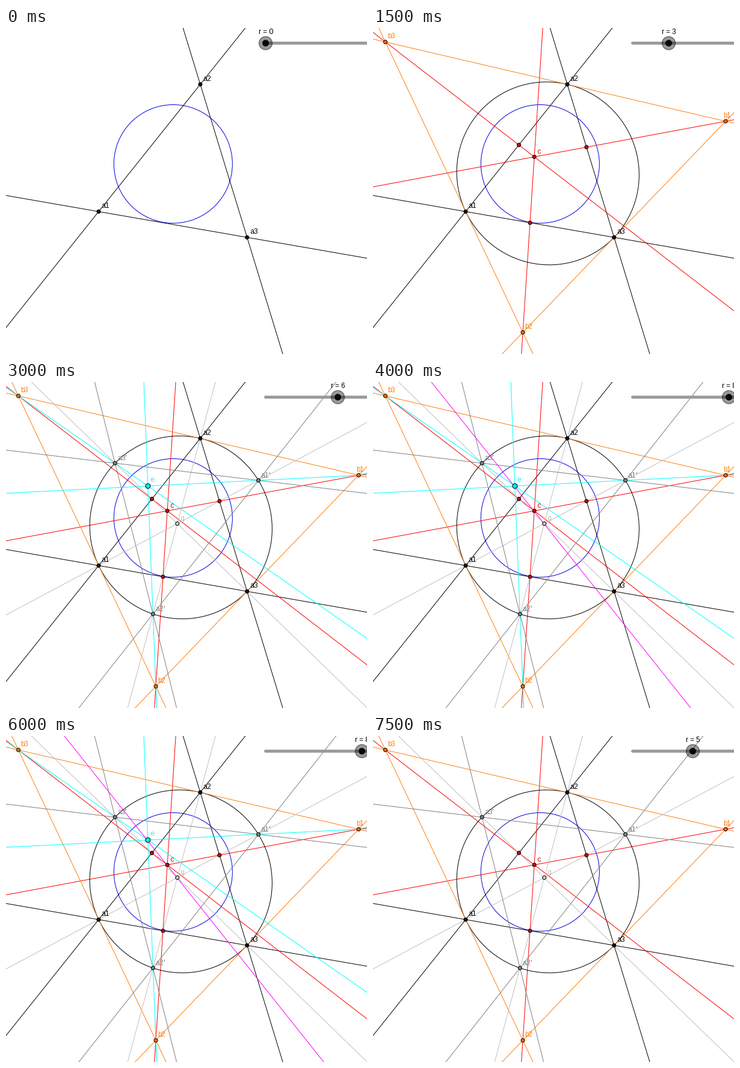
Write a matplotlib script that moves like this. It is 600 px wide and 542 px high and loops after 8000 ms.

```python
import matplotlib.pyplot as plt
import numpy as np
from matplotlib.animation import FuncAnimation
from matplotlib.patches import Circle

W, H, DPI = 600, 542, 100
PX = 72 / DPI  # one pixel in points
STEP_MS = 500
FRAMES = 16

BLACK, BLUE, RED, ORANGE = "#000000", "#0000e0", "#ff0000", "#ff7f0e"
GREY, SILVER, CYAN = "#808080", "#c0c0c0", "#00ffff"
MAGENTA, INDIGO = "#ff00ff", "#4b0082"

plt.rcParams["font.family"] = "Liberation Sans"
plt.rcParams["text.hinting_factor"] = 1  # whole-pixel letter spacing
plt.rcParams["toolbar"] = "None"

fig = plt.figure(figsize=(W / DPI, H / DPI), dpi=DPI, facecolor="white")
ax = fig.add_axes([0, 0, 1, 1])
ax.set_xlim(0, W)
ax.set_ylim(H, 0)
ax.axis("off")

# The blue circle is the absolute of a projective metric.
CENTER, RADIUS = np.array([277.8, 226.0]), 98.5
CORNERS = np.array([[154.0, 305.2], [322.9, 93.7], [400.7, 348.1]])

rel = CORNERS - CENTER
gram = rel @ rel.T - RADIUS**2
weights = 1 / np.sqrt(np.diag(gram))
gram = gram * np.outer(weights, weights)
SIDES = 1 - np.array([gram[1, 2], gram[0, 2], gram[0, 1]])


def point(coords):
    """Stage position of coordinates relative to the normalised corners."""
    mass = np.asarray(coords) * weights
    return mass @ CORNERS / mass.sum(axis=-1, keepdims=True)


P = {
    "c": point(np.linalg.solve(gram, np.ones(3))),
    "g": point([1, 1, 1]),
    "e": point(SIDES * (np.sum(SIDES**2) - 2 * SIDES**2)),
    "s": point(SIDES),
}
for k in range(3):
    corner = np.eye(3)[k]
    sign = 1 - 2 * corner
    n = k + 1
    P[f"a{n}"] = CORNERS[k]
    P[f"m{n}"] = point(1 - corner)
    P[f"b{n}"] = point(SIDES * sign)
    P[f"a{n}'"] = point(np.where(corner, -SIDES, SIDES.sum() - SIDES[k]))

stages = []  # (step at which the artist appears, artist)


def add(step, artist):
    stages.append((step, artist))


def line(step, p, q, color):
    add(step, ax.axline(p, q, color=color, lw=PX, zorder=2 + step / 10))


def lines(step, pairs, color):
    for pair in pairs.split():
        p, q = pair.split("-")
        line(step, P[p], P[q], color)


def dots(step, names, fill, radius=3):
    for name in names.split():
        add(step, ax.add_patch(Circle(P[name], radius, fc=fill, ec=BLACK,
                                      lw=PX, zorder=5)))


def text(x, y, s, color, z=4):
    return ax.text(x, y, s, color=color, fontsize=12 * PX, va="baseline",
                   ha="left", zorder=z)


def labels(step, names, color, dx=4, dy=-6):
    for name in names.split():
        x, y = P[name]
        add(step, text(x + dx, y + dy, name, color))


# Given triangle and circle
lines(0, "a1-a2 a2-a3 a1-a3", BLACK)
ax.add_patch(Circle(CENTER, RADIUS, fill=False, ec=BLUE, lw=PX, zorder=2))
dots(0, "a1 a2 a3", "#101010")
labels(0, "a1 a2 a3", BLACK)

# Bisectors, circumscribed conic, tangents
lines(1, "b1-c b2-c b3-c", RED)
dots(1, "m1 m2 m3 c", "#cc0808")
labels(1, "c", "#d01010", 4.5, -5.3)

turn = np.linspace(0, np.pi, 361)
u, v, w = (np.cos(turn + k * 2 * np.pi / 3) for k in range(3))
conic = point(np.column_stack([v * w, w * u, u * v]) * SIDES)
add(2, ax.plot(*conic.T, color=BLACK, lw=PX, zorder=2.2)[0])

lines(3, "b1-b2 b2-b3 b3-b1", ORANGE)
dots(3, "b1 b2 b3", "#ff6f10")
labels(3, "b2 b3", ORANGE, 3.6)
labels(3, "b1", ORANGE, -3.5)

# Medians and the triangle they cut on the conic
lines(4, "a1-a1' a2-a2' a3-a3'", SILVER)
dots(4, "g", "#cccccc")
labels(4, "g", SILVER, 4.5, -5.3)
lines(5, "a1'-a2' a2'-a3' a3'-a1'", GREY)
dots(5, "a1' a2' a3'", GREY)
labels(5, "a1' a2' a3'", GREY, 3.6, -4.6)

# Perspective lines, central line, symmedians
lines(6, "b1-a1' b2-a2' b3-a3'", CYAN)
dots(6, "e", "#00e8ff", 4)
labels(6, "e", CYAN, 3.6, -7)
line(7, (97, 0), (528, 542), MAGENTA)
lines(9, "a1-b1 a2-b2 a3-b3", INDIGO)
dots(9, "s", INDIGO)

# Slider
RAIL_Y = 25.2
ax.plot([431.5, W + 20], [RAIL_Y, RAIL_Y], color="#999999", lw=5 * PX,
        solid_capstyle="round", snap=False, zorder=6)
halo = ax.add_patch(Circle((0, RAIL_Y), 11, fc=(0, 0, 0, 0.4),
                           ec=(0, 0, 0, 0.6), lw=PX, zorder=7))
knob = ax.add_patch(Circle((0, RAIL_Y), 5.5, fc="#080808", ec="none",
                           zorder=8))
caption = text(0, 10.2, "", BLACK, 9)


def update(i):
    r = min(i, 9, 20 - i)  # climb, rest at the end, come back
    for step, artist in stages:
        artist.set_visible(step <= r)
    x = 431.5 + 20 * r
    halo.center = (x, RAIL_Y)
    knob.center = (x, RAIL_Y)
    caption.set_x(x - 11.5)
    caption.set_text(f"r = {r}")
    return []


anim = FuncAnimation(fig, update, frames=FRAMES, interval=STEP_MS,
                     repeat=True, repeat_delay=0, blit=False)
plt.show()
```
